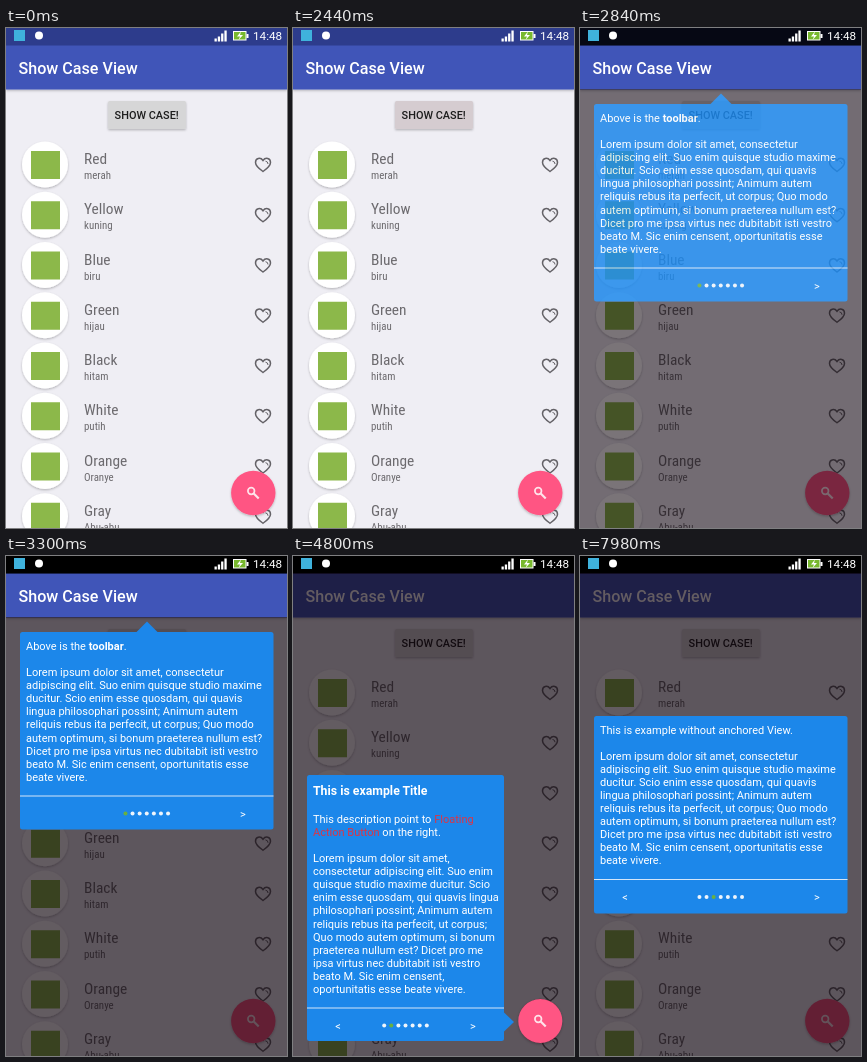
An HTML page that plays this animation: 281 by 500 pixels, repeating every 8000 ms.

```html
<!DOCTYPE html>
<html lang="en">
<head>
<meta charset="utf-8">
<title>Show Case View</title>
<style>
  html, body { margin: 0; width: 100%; height: 100%; overflow: hidden; background: #efeef4; }
  svg { display: block; width: 100%; height: 100%; }
  text { font-family: Roboto, sans-serif; }
  .row { font-family: "Roboto Condensed", Roboto, sans-serif; font-stretch: condensed; fill: #6c6a6e; }
  .body { font-size: 11px; fill: #fff; }
</style>
</head>
<body>
<svg id="stage" viewBox="0 0 281 500"></svg>
<script>
const LOOP = 8000;
const BUTTON_PRESS = [2380, 2620];
const FADE = [2640, 2900];
const HIGHLIGHT_RAMP = 100;
const cards = [
  {
    from: 0, to: 4420, press: [4140, 4400], touch: [236, 258],
    x: 14, y: 76, w: 253.5, h: 197.5, footer: 240, active: 0, back: false,
    pointer: 'M130 76.5L141 65.5L152 76.5z',
    hole: 'M0 17H281V61H0z',
    lines: [[94, 'Above is the <tspan font-weight="700">toolbar</tspan>.']], loremY: 120,
  },
  {
    from: 4420, to: 6820, press: [6610, 6800], touch: [187, 468.5],
    x: 14, y: 219, w: 197, h: 266, footer: 452, active: 1, back: true,
    pointer: 'M210.5 456L221 466L210.5 476z',
    hole: 'M225.3 465a22 22 0 1 0 44 0a22 22 0 1 0 -44 0z',
    title: [238.5, 'This is example Title'],
    lines: [
      [267, 'This description point to <tspan fill="#dc3545">Floating</tspan>'],
      [280, '<tspan fill="#dc3545">Action Button</tspan> on the right.'],
    ], loremY: 306,
  },
  {
    from: 6820, to: LOOP, press: [LOOP, LOOP], touch: [237, 341],
    x: 14, y: 160, w: 253.5, h: 197.5, footer: 323.5, active: 2, back: true,
    pointer: '', hole: '',
    lines: [[178, 'This is example without anchored View.']], loremY: 203.5,
  },
];

const wideLorem = [
  'Lorem ipsum dolor sit amet, consectetur',
  'adipiscing elit. Suo enim quisque studio maxime',
  'ducitur. Scio enim esse quosdam, qui quavis',
  'lingua philosophari possint; Animum autem',
  'reliquis rebus ita perfecit, ut corpus; Quo modo',
  'autem optimum, si bonum praeterea nullum est?',
  'Dicet pro me ipsa virtus nec dubitabit isti vestro',
  'beato M. Sic enim censent, oportunitatis esse',
  'beate vivere.',
];
const narrowLorem = [
  'Lorem ipsum dolor sit amet,',
  'consectetur adipiscing elit. Suo enim',
  'quisque studio maxime ducitur. Scio',
  'enim esse quosdam, qui quavis lingua',
  'philosophari possint; Animum autem',
  'reliquis rebus ita perfecit, ut corpus;',
  'Quo modo autem optimum, si bonum',
  'praeterea nullum est? Dicet pro me',
  'ipsa virtus nec dubitabit isti vestro',
  'beato M. Sic enim censent,',
  'oportunitatis esse beate vivere.',
];
const colours = [
  ['Red', 'merah'], ['Yellow', 'kuning'], ['Blue', 'biru'], ['Green', 'hijau'],
  ['Black', 'hitam'], ['White', 'putih'], ['Orange', 'Oranye'], ['Gray', 'Abu-abu'],
];

const rect = (x, y, w, h, fill, more = '') =>
  `<rect x="${x}" y="${y}" width="${w}" height="${h}" fill="${fill}" ${more}/>`;
const circle = (x, y, r, fill, more = '') =>
  `<circle cx="${x}" cy="${y}" r="${r}" fill="${fill}" ${more}/>`;
const text = (x, y, content, more = '') => `<text x="${x}" y="${y}" ${more}>${content}</text>`;

function row([name, translation], i) {
  return `<g transform="translate(0 ${i * 50.25})">
    ${circle(39, 136.5, 23, '#fff', 'filter="url(#shadow)"')}
    ${rect(25, 123, 29, 28, '#8cb84a')}
    ${text(78, 136, name, 'class="row" font-size="15.4"')}
    ${text(78, 151, translation, 'class="row" font-size="10.9"')}
    <path d="M257 143.5C252 140 249.5 137.5 249.5 134.5C249.5 130 254.5 129 257 132.5
      C259.5 129 264.5 130 264.5 134.5C264.5 137.5 262 140 257 143.5z"
      fill="none" stroke="#646267" stroke-width="1.5"/>
    <path d="M259.5 133.2q2.5 .2 2.5 2.8" fill="none" stroke="#646267"/></g>`;
}

function statusIcons() {
  const bars = [3, 5, 8, 11].map((h, i) => rect(208.5 + i * 3.3, 13.5 - h, 2.3, h, '#fff')).join('');
  return rect(8, 2, 11, 11, '#3fb2dc') + circle(33, 7.5, 4, '#fff') + bars +
    rect(227.5, 3.5, 12.5, 8.5, '#78b82e', 'stroke="#fff"') + rect(240.5, 6, 2, 4, '#fff') +
    '<path d="M235 3.5L231 8.5H234L232.5 12L237 7H234z" fill="#fff"/>' +
    text(247, 12, '14:48', 'font-size="11.7" fill="#fff"');
}

function card(c) {
  const middle = c.x + c.w / 2;
  const footerMid = c.footer + 17.5;
  const pressW = c.w / (c.back ? 3.18 : 4.03);
  const dots = Array.from({ length: 7 }, (_, i) =>
    circle(middle - 21.3 + i * 7.1, footerMid, 2, i === c.active ? '#69b03f' : '#eef5fc')).join('');
  const lorem = c.w > 200 ? wideLorem : narrowLorem;
  const bodyLines = [...c.lines, ...lorem.map((line, i) => [c.loremY + i * 13.1, line])];
  const arrow = 'text-anchor="middle" class="body"';
  return `<g class="card">
    <path fill-rule="evenodd" d="M0 17H281V500H0z${c.hole}" fill="#0c0008" fill-opacity=".64"/>
    ${rect(c.x, c.y, c.w, c.h, '#1c87ea', 'rx="2.5"')}
    <path d="${c.pointer}" fill="#1c87ea"/>
    ${c.title ? text(20, c.title[0], c.title[1], 'font-size="12.3" font-weight="700" fill="#fff"') : ''}
    ${bodyLines.map(([y, line]) => text(20, y, line, 'class="body"')).join('')}
    ${rect(c.x, c.footer - .5, c.w, 1, '#d3e6fa')}
    ${rect(c.x + c.w - pressW, c.footer + .5, pressW, c.y + c.h - c.footer - .5, '#fff', 'class="highlight"')}
    ${dots}
    ${c.back ? text(45, footerMid + 4, '&lt;', arrow) : ''}
    ${text(c.w > 200 ? 237 : 180, footerMid + 4, '&gt;', arrow)}
    <g class="touch">
      ${circle(...c.touch, 9.5, '#fff', 'fill-opacity=".25"')}
      ${circle(...c.touch, 7.5, '#e4f1fc', 'fill-opacity=".65"')}
    </g>
  </g>`;
}

const stage = document.getElementById('stage');
stage.innerHTML = `
  <defs><filter id="shadow" x="-30%" y="-30%" width="160%" height="160%">
    <feDropShadow dx="0" dy="1.2" stdDeviation="1.3" flood-opacity=".25"/></filter></defs>
  ${rect(0, 0, 281, 500, '#efeef4')}
  <g filter="url(#shadow)">${rect(0, 17, 281, 44.5, '#3f54b8')}</g>
  ${rect(0, 0, 281, 17.5, '#2d3c8c')}
  ${text(12.5, 46, 'Show Case View', 'font-size="16.1" font-weight="500" fill="#fff"')}
  ${rect(102, 73, 78, 28, '#d6d6d7', 'id="button" rx="1.5" filter="url(#shadow)"')}
  ${text(140.7, 91, 'SHOW CASE!', 'font-size="10.9" font-weight="500" fill="#1c1c1c" text-anchor="middle"')}
  ${colours.map(row).join('')}
  ${circle(247.3, 465, 22.2, '#ff5583', 'filter="url(#shadow)"')}
  <circle cx="245.2" cy="463" r="3.3" fill="none" stroke="#ffe3ea" stroke-width="1.7"/>
  <path d="M247.7 465.5L252.7 470.5" stroke="#ffe3ea" stroke-width="2.2"/>
  <g id="overlay">${rect(0, 0, 281, 17.5, '#000')}${cards.map(card).join('')}</g>
  ${statusIcons()}`;

const button = document.getElementById('button');
const overlay = document.getElementById('overlay');
const cardNodes = [...document.querySelectorAll('.card')];
const within = (t, [from, to]) => t >= from && t < to;
const ramp = (t, from, length) => Math.min(1, Math.max(0, (t - from) / length));
const show = (node, visible) => node.setAttribute('display', visible ? 'inline' : 'none');

function draw(now) {
  const t = now % LOOP;
  overlay.setAttribute('opacity', 1 - (1 - ramp(t, FADE[0], FADE[1] - FADE[0])) ** 1.3);
  button.setAttribute('fill', within(t, BUTTON_PRESS) ? '#d5ccd0' : '#d6d6d7');
  cards.forEach((c, i) => {
    const node = cardNodes[i];
    const pressed = within(t, c.press);
    show(node, within(t, [c.from, c.to]));
    show(node.querySelector('.touch'), pressed);
    node.querySelector('.highlight').setAttribute('opacity', pressed ? .2 * ramp(t, c.press[0], HIGHLIGHT_RAMP) : 0);
  });
}

const start = performance.now();
function tick() {
  draw(performance.now() - start);
  requestAnimationFrame(tick);
}
tick();
</script>
</body>
</html>
```
